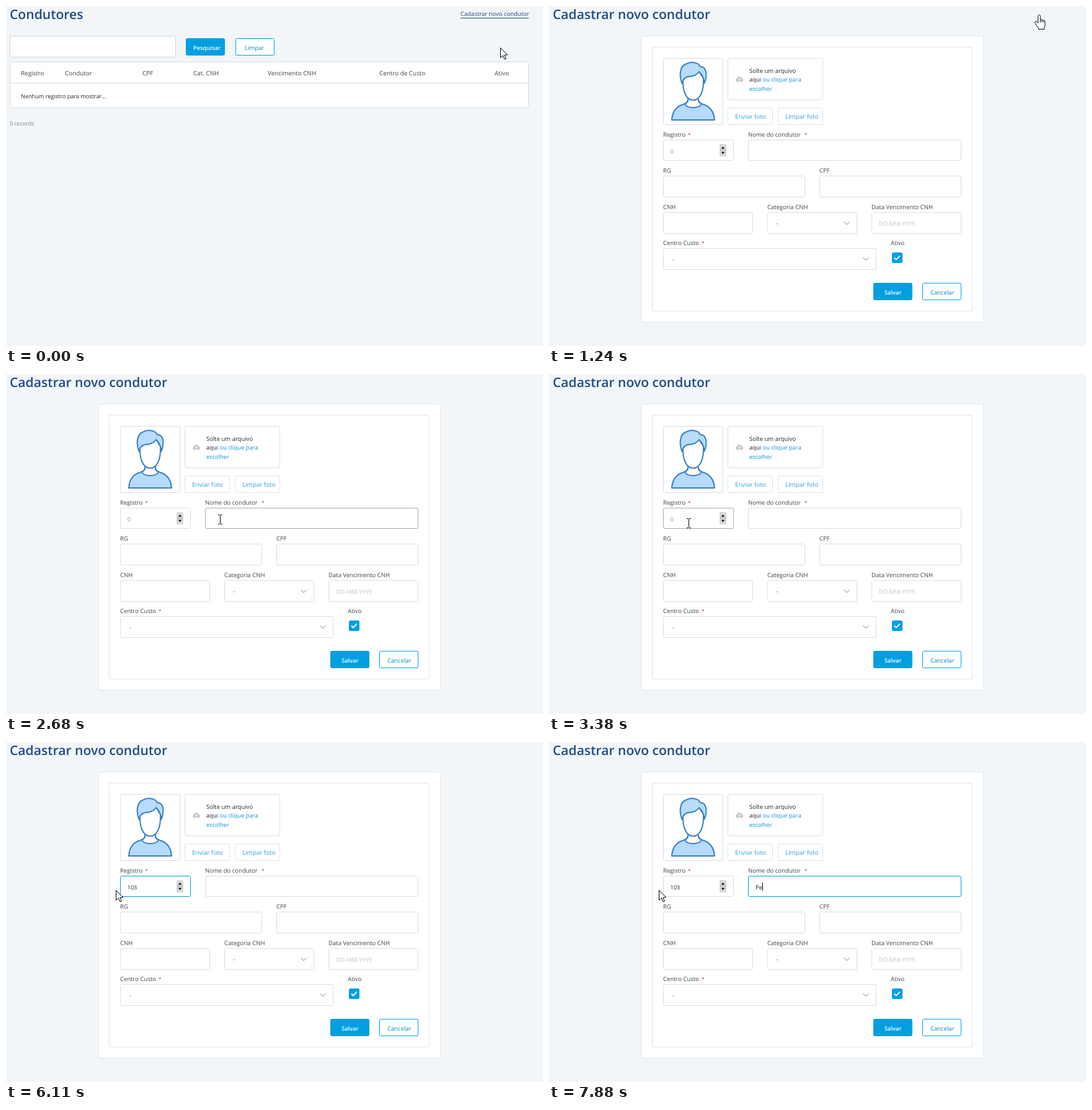
These frames come from a looping animation (866 px wide and 549 px high, 8 s). An HTML page:

```html
<!DOCTYPE html>
<html lang="pt">
<head>
<meta charset="utf-8">
<title>Condutores</title>
<style>
html, body { margin: 0; width: 100%; height: 100%; overflow: hidden; background: #f2f6f9; }
svg { display: block; width: 866px; height: 549px; }
text { font-family: "Open Sans", "Noto Sans", sans-serif; text-rendering: geometricPrecision; white-space: pre; }
</style>
</head>
<body>
<svg id="stage" viewBox="0 0 866 549"></svg>
<script>
const LOOP = 8000;
const NAVY = '#224a86', BLUE = '#009fe0', INK = '#3c4650', DARK = '#20262c';
const LINE = '#dadee2', FLAT = '#dfe4e8', HOVER = '#a4abb3', GREY = '#8b9198', SKY = '#0d94d2';

const text = (x, y, s, { size = 9.5, fill = INK, extra = '' } = {}) =>
  `<text x="${x}" y="${y}" font-size="${size}" fill="${fill}" ${extra}>${s}</text>`;
const box = (x, y, w, h, stroke = LINE, fill = '#fff', extra = '') =>
  `<rect x="${x + .5}" y="${y + .5}" width="${w - 1}" height="${h - 1}" rx="2" fill="${fill}" stroke="${stroke}" ${extra}/>`;
const title = s => text(6, 21, s, { size: 21.1, fill: NAVY, extra: 'font-weight="600"' });
const chevron = (x, y) =>
  `<path d="M${x} ${y}l4.500 4.500 4.500-4.500" fill="none" stroke="#7c848c"/>`;

// buttons share one height and baseline
const solid = (x, y, s, pad) => box(x, y, 63, 28, BLUE, BLUE) +
  text(x + pad, y + 18.5, s, { size: 9.3, fill: '#fff', extra: 'font-weight="600"' });
const outline = (x, y, s, pad) => box(x, y, 63, 28, BLUE) + text(x + pad, y + 18.5, s, { fill: '#0b84c0' });
const soft = (x, s) => box(x, 164, 73, 28, FLAT) + text(x + 12, 182, s, { size: 9.9, fill: '#35a1d8' });

// an input with its label above
const field = (x, y, w, label, { must = 0, id = '' } = {}) =>
  text(x, y - 5, label, { size: 9.55 }) +
  (must ? text(x + must, y - 5, '*', { size: 8.5, fill: '#b5523f' }) : '') +
  box(x, y, w, y > 250 ? 35 : 34, LINE, '#fff', id && `id="${id}"`);

const heads = { Registro: 24, Condutor: 95, CPF: 220, 'Cat. CNH': 302,
  'Vencimento CNH': 422, 'Centro de Custo': 602, Ativo: 788 };

const listPage = title('Condutores') +
  `<g id="link">${text(733, 16, 'Cadastrar novo condutor', { fill: 'currentColor' })}
   <path d="M733 19.500H843" stroke="currentColor"/></g>` +
  box(6, 48, 268, 35, '#ced3d8') + solid(290, 52, 'Pesquisar', 12) + outline(370, 52, 'Limpar', 15) +
  box(6, 90, 837, 75) + `<path d="M7 124.500H842" stroke="${LINE}"/>` +
  Object.entries(heads).map(([s, x]) => text(x, 112, s, { size: 9.9 })).join('') +
  text(24, 149, 'Nenhum registro para mostrar...', { size: 9.15, fill: DARK }) +
  text(6, 193, '0 records', { size: 9.1, fill: '#7d8692' });

const avatar = `<g stroke="#3a7fc0" stroke-width="2" stroke-linejoin="round" fill="#b6dbfd">
  <path d="M198 184C199 169 206 162 216 159C222 157 224.500 155 224.500 149H240.500C240.500 155 243 157 249 159C259 162 266 169 267 184Z"/>
  <path d="M219 158C222 166 243 166 246 158C241 156 240.500 154 240.500 148H224.500C224.500 154 224 156 219 158Z" fill="#fff"/>
  <path d="M216 117C215 137 221 152 232.500 152C244 152 250 137 249 117L241 104L222 112Z" fill="#fff"/>
  <path d="M214.500 125C210 113 210 98 221 93.500C230 89 241 91 244 98C254 98 256 111 250.500 125C250 117 247 111 242 106C238 112 230 114 224 114C218 116 216 119 214.500 125Z"/></g>`;
const cloud = `<path d="M303.500 122.500a2.800 2.800 0 0 1-.3-5.500a3.800 3.800 0 0 1 7.200-.6a3.100 3.100 0 0 1 .1 6.100z" fill="#c6c9cd"/>
  <path d="M306.800 121v-3M305 118.600l1.800-1.800 1.800 1.800" stroke="#fff" fill="none"/>`;
const spinner = `<path d="M276 224h9v9h-9zM276 233h9v9h-9z" fill="#e6e6e6" stroke="#a5a5a5" stroke-width=".8"/>
  <path d="M277.500 230.500h6l-3-4zM277.500 235.500h6l-3 4z" fill="#222"/>`;
const checkbox = `<rect x="553" y="398" width="17" height="17" rx="2.500" fill="${BLUE}"/>
  <path d="M557 406.500l3 3 5.800-6" fill="none" stroke="#fff" stroke-width="1.800"/>`;

const formPage = title('Cadastrar novo condutor') +
  box(148, 48, 553, 463, FLAT) + box(166, 66, 517, 427, FLAT) +
  box(184, 84, 97, 108) + avatar + box(288, 84, 154, 68) + cloud +
  text(323, 108, 'Solte um arquivo', { fill: DARK }) +
  text(323, 122, `aqui <tspan fill="${SKY}">ou clique para</tspan>`, { size: 9.4, fill: DARK }) +
  text(323, 137, 'escolher', { size: 9.3, fill: SKY }) +
  soft(288, 'Enviar foto') + soft(369, 'Limpar foto') +
  field(184, 216, 114, 'Registro', { must: 40, id: 'reg' }) + spinner +
  field(321, 216, 344, 'Nome do condutor', { must: 91, id: 'name' }) +
  field(184, 274, 229, 'RG') + field(436, 274, 229, 'CPF') +
  field(184, 333, 145, 'CNH') + field(352, 333, 145, 'Categoria CNH') +
  field(520, 333, 145, 'Data Vencimento CNH') + field(184, 391, 344, 'Centro Custo', { must: 62 }) +
  text(366, 355, '-', { size: 12, fill: GREY }) + text(198, 413, '-', { size: 12, fill: GREY }) +
  text(532, 355, 'DD-MM-YYYY', { fill: '#c0c4c8' }) +
  chevron(475.5, 348.5) + chevron(506.5, 406) + text(551, 386, 'Ativo') + checkbox +
  solid(523, 447, 'Salvar', 18) + outline(602, 447, 'Cancelar', 13) +
  `<rect id="sel" x="196" y="227" width="5" height="13" fill="#0078d7"/>` +
  text(195.7, 238, '', { size: 9.1, extra: 'id="regText"' }) +
  text(333, 238, '', { fill: DARK, extra: 'id="nameText"' }) +
  `<rect id="caret" y="227" width="1" height="13"/>`;

const pointer = `<circle id="glow" r="12" fill="#ff0" opacity=".5" style="mix-blend-mode:multiply"/>
  <g stroke="#000" fill="#fff" stroke-linejoin="round">
  <path id="arrow" d="M.5.500V16.500L4.300 13L7 19L9.400 18L6.800 12H11.800Z"/>
  <path id="hand" d="M.8 2.300a1.800 1.800 0 0 1 3.600 0V8.500q1.400-1 2.800.3q1.500-.7 2.700.6q2.100-.2 2.100 2v4.600q0 3-1.600 5.500v2H1.400v-2Q-1.500 18-4.300 13.500Q-5 11.200-3 10.800Q-1 10.800 .8 13.500zM4.400 8.500v4M7.200 9v3.500M9.900 9.600v3"/></g>
  <path id="beam" d="M-3-7.500H-.5L.5-6.500L1.500-7.500H4M.5-6.500V6.500M-3 7.500H-.5L.5 6.500L1.500 7.500H4" fill="none" stroke="#000"/>`;

document.getElementById('stage').innerHTML =
  `<g id="list">${listPage}</g><g id="form">${formPage}</g><g id="cursor">${pointer}</g>`;

const el = {};
document.querySelectorAll('[id]').forEach(n => el[n.id] = n);
const show = (n, on) => n.setAttribute('visibility', on ? 'inherit' : 'hidden');

// the pointer glides from stop to stop in visible steps
const stops = [
  { x: 797, y: 67 },
  { from: 90, to: 570, n: 7, x: 788, y: 14 },
  { from: 1570, to: 2200, n: 9, x: 573, y: 186 },
  { from: 2280, to: 2360, n: 2, x: 489, y: 217 },
  { from: 2430, to: 2910, n: 7, x: 237, y: 249 },
  { from: 3070, to: 3380, n: 3, x: 225, y: 241 },
  { from: 4075, to: 4230, n: 3, x: 179, y: 239 },
  { from: 4330, to: 4330, n: 1, x: 177, y: 239 }
];

// share of a stepped change done at time t
function stepped(t, from, to, n) {
  if (t < from) return 0;
  if (t >= to) return 1;
  return (Math.floor((t - from) / (to - from) * (n - 1)) + 1) / n;
}

function place(t) {
  let { x, y } = stops[0];
  for (const s of stops.slice(1)) {
    const p = stepped(t, s.from, s.to, s.n);
    x += (s.x - x) * p;
    y += (s.y - y) * p;
  }
  return [Math.round(x), Math.round(y)];
}

const typed = (s, times, t) => s.slice(0, times.filter(k => t >= k).length);
const mix = (a, b, p) => `color-mix(in srgb, ${b} ${p * 100}%, ${a})`;
const within = (t, a, b) => t >= a && t < b;

function draw(t) {
  const onForm = t >= 1240;
  const [x, y] = place(t);
  show(el.list, !onForm);
  show(el.form, onForm);

  const onLink = !onForm && y < 20;
  el.link.style.color = onLink ? '#2f86d8' : '#24477a';

  const inRow = onForm && within(y, 216, 250);
  const overReg = inRow && within(x, 184, 298);
  const overName = inRow && within(x, 321, 665);
  const hand = onLink || within(t, 1240, 1570);
  const beam = overReg || overName;
  show(el.hand, hand);
  show(el.beam, beam);
  show(el.arrow, !hand && !beam);
  show(el.glow, within(t, 640, 780) || within(t, 3990, 4470));
  el.cursor.setAttribute('transform', `translate(${x} ${y})`);

  const focusIn = stepped(t, 3990, 4160, 3), swap = stepped(t, 6640, 6810, 3);
  el.reg.style.stroke = mix(overReg ? HOVER : LINE, BLUE, focusIn * (1 - swap));
  el.name.style.stroke = mix(overName ? HOVER : LINE, BLUE, swap);

  const number = typed('103', [5170, 5480, 5800], t);
  const name = typed('Pe', [7650, 7880], t);
  const picked = within(t, 4150, 5170);
  show(el.sel, picked);
  el.regText.textContent = number || '0';
  el.regText.style.fill = picked ? '#fff' : number ? DARK : GREY;
  el.nameText.textContent = name;

  // the caret blinks on its own beat, after the last letter
  const lit = (t - 5570 + 1010) % 1010 < 540;
  show(el.caret, number !== '' && lit);
  el.caret.setAttribute('x', swap ? 333 + Math.round(name.length * 5.6) : 196 + number.length * 5);
}

const begin = performance.now();
function tick() {
  draw((performance.now() - begin) % LOOP);
  requestAnimationFrame(tick);
}
tick();
</script>
</body>
</html>
```
